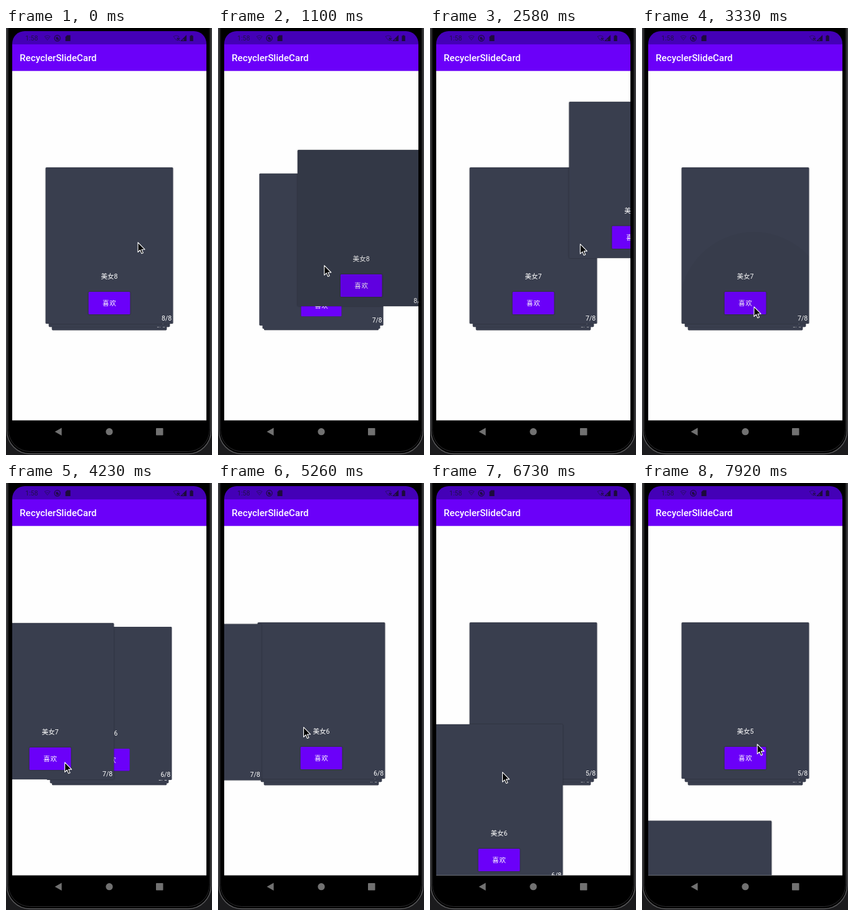
Write an HTML page that moves like this. It is 331x683 px and loops after 8 s.

```html
<!DOCTYPE html>
<html lang="zh-CN">
<head>
<meta charset="utf-8">
<title>Slide cards</title>
<style>
  html, body { margin: 0; width: 100%; height: 100%; overflow: hidden; background: #1b1b1d; }
  svg { display: block; width: 331px; height: 683px; }
  text { font-family: Roboto, "Noto Sans CJK SC", "Noto Sans CJK", sans-serif; fill: #fff; }
  .card > text { font-size: 10.6px; }
  .mid { text-anchor: middle; }
  .end { text-anchor: end; }
  .face { fill: #393e4e; filter: drop-shadow(0 .7px .8px rgba(0, 0, 0, .35)); }
  .button { fill: #6b00f9; filter: drop-shadow(0 .8px .8px rgba(0, 0, 0, .4)); }
  .dark { fill: #1d0b3c; }
  .line { fill: none; stroke: #1d0b3c; stroke-width: 1.2; }
  .faint { fill: none; stroke: #2c0c70; }
</style>
</head>
<body>
<svg viewBox="0 0 331 683">
  <defs>
    <clipPath id="screen"><rect x="10" y="5" width="312" height="659" rx="20"/></clipPath>
    <clipPath id="content"><rect x="10" y="68.7" width="312" height="558.9"/></clipPath>
    <clipPath id="cardShape"><rect x="-102.4" y="-125" width="204.800" height="250" rx="1.5"/></clipPath>
  </defs>

  <!-- phone body -->
  <rect x="1.5" y="-60" width="328" height="741" rx="37" fill="#000" stroke="#5b5b5d" stroke-width="1.4"/>
  <rect x="3.8" y="-60" width="323.400" height="737.500" rx="35" fill="none" stroke="#2c2c2e"/>

  <g clip-path="url(#screen)">
    <rect x="10" y="5" width="312" height="659" fill="#000"/>
    <rect x="10" y="68" width="312" height="559.6" fill="#fefefe"/>
    <rect x="10" y="26" width="312" height="42.7" fill="#6b00f9"/>
    <rect x="10" y="5" width="312" height="21.2" fill="#4400b7"/>
  </g>

  <!-- status bar -->
  <text x="31" y="20" style="font-size:10.6px;fill:#21104a">1:58</text>
  <path class="faint" d="M62 13.5q4.500-3 9 0l-4.500 6zM64.500 15.500h4"/>
  <circle class="line" cx="82.500" cy="16.300" r="4.600"/>
  <path class="dark" d="M80 14.500h4.500l-2 2h2.500v2.200h-4z"/>
  <path class="dark" d="M98.200 11.500h5.300v9.500h-8v-6.700z"/>
  <path class="faint" d="M269 13.500q4.500-3 9 0l-4.500 6z"/>
  <path class="line" d="M275 16l4 4m0-4l-4 4M281.500 20.500l8-8v8z"/>
  <path class="dark" d="M285.500 16.500l4-4v8h-4z"/>
  <path class="dark" d="M296.800 11.500h2.600v1h1.400v8.500h-5.400v-8.500h1.400z"/>
  <text x="22.100" y="53" style="font-size:15.17px;font-weight:500">RecyclerSlideCard</text>

  <g id="stack" clip-path="url(#content)"></g>

  <!-- navigation bar -->
  <g fill="#717171">
    <path d="M78.500 645.700l11-6.200v12.400z"/>
    <circle cx="166" cy="645.700" r="5.600"/>
    <rect x="241" y="640" width="11.500" height="11.500" rx=".8"/>
  </g>

  <path id="cursor" d="M0 0v15.500l3.500-3.400 2.400 5.600 2.500-1-2.400-5.500h5z"
        fill="#000" stroke="#fff" stroke-width="1.100" stroke-linejoin="round"/>
</svg>

<script>
const LOOP = 8000, START = 360, STEP = 148;
const CENTER = [166, 348.1];
const FULL_SWIPE = 156, SCALE_GAP = 0.05, DROP_GAP = 11.37;
const CURSOR_FOLLOW = 0.9;
const HOME = [0, 0];
const REST = [212, 343];

// A card is dragged to `release`, flung to `out`; the cursor then glides on to `next`.
const swipes = [
  { card: 8, drag: [808, 1988], fling: [1988, 3024], grab: [113, 405],
    bend: [108, -28], release: [126.5, -127], out: [305, -10],
    via: [275, 340], next: [180, 446] },
  { card: 7, drag: [3320, 3912], fling: [4208, 5688], grab: [180, 446],
    bend: [-48, 0], release: [-95, 1], out: [-397, 5],
    via: [133, 423], next: [166, 316] },
  { card: 6, drag: [5984, 6724], fling: [6724, 8204], grab: [166, 316],
    bend: [-27, 80], release: [-55, 163], out: [-65, 464],
    via: [112, 480], next: [197, 408] }
];

const clamp = (v, lo = 0, hi = 1) => Math.min(hi, Math.max(lo, v));
const progress = (t, [from, to]) => clamp((t - from) / (to - from));
const mix = (a, b, p) => a.map((v, i) => v + (b[i] - v) * p);
const arc = (a, via, b, p) => mix(mix(a, via, p), mix(via, b, p), p);
const easeOut = p => 1 - (1 - p) ** 1.5;
const easeIn = p => p ** 3;

function offset(s, t) {
  return t < s.fling[0]
    ? arc(HOME, s.bend, s.release, easeOut(progress(t, s.drag)))
    : mix(s.release, s.out, easeIn(progress(t, s.fling)));
}

function cursorAt(t) {
  const i = swipes.findLastIndex(s => t >= s.drag[0]);
  if (i < 0) return mix(REST, swipes[0].grab, progress(t, [212, swipes[0].drag[0]]));
  const s = swipes[i];
  const [dx, dy] = offset(s, Math.min(t, s.fling[0]));
  const held = [s.grab[0] + dx * CURSOR_FOLLOW, s.grab[1] + dy * CURSOR_FOLLOW];
  const glideEnd = swipes[i + 1]?.drag[0] ?? LOOP;
  const p = progress(t, [s.fling[0], glideEnd]);
  return p > 0 ? arc(held, s.via, s.next, p) : held;
}

function rippleAt(s, t) {
  const age = t - s.drag[0] + 100;
  return {
    cx: s.grab[0] - CENTER[0],
    cy: s.grab[1] - CENTER[1],
    r: clamp(60 + 0.6 * age, 0, 300),
    opacity: 0.1 * clamp(Math.min(age / 300, (s.drag[1] - t) / 400))
  };
}

function makeCard(n) {
  const g = document.createElementNS("http://www.w3.org/2000/svg", "g");
  g.setAttribute("class", "card");
  g.innerHTML = `
    <rect class="face" x="-102.4" y="-125" width="204.8" height="250" rx="1.5"/>
    <text class="mid" y="53">美女${n}</text>
    <rect class="button" x="-33.4" y="73.8" width="66.8" height="36.2" rx="1.5"/>
    <text class="mid" x=".3" y="96" letter-spacing=".6">喜欢</text>
    <text class="end" x="100.3" y="120">${n}/8</text>
    <g clip-path="url(#cardShape)"><circle class="ripple" r="0"/></g>`;
  document.getElementById("stack").prepend(g);
  return { n, g, ripple: g.querySelector(".ripple"), swipe: swipes.find(s => s.card === n) };
}

const cards = [8, 7, 6, 5, 4, 3, 2].map(makeCard); // front to back
const cursor = document.getElementById("cursor");

function place(el, [x, y], scale = 1) {
  el.setAttribute("transform", `translate(${x} ${y}) scale(${scale})`);
}

function draw(t) {
  let passed = 0; // how far the stack has moved up, in cards
  for (const { n, g, ripple, swipe } of cards) {
    const depth = 8 - n - passed;
    const level = clamp(depth, 0, 2);
    const [dx, dy] = swipe ? offset(swipe, t) : HOME;
    g.style.display = depth > 3 ? "none" : "";
    place(g, [CENTER[0] + dx, CENTER[1] + dy + level * DROP_GAP], 1 - level * SCALE_GAP);
    if (swipe) {
      for (const [k, v] of Object.entries(rippleAt(swipe, t))) ripple.setAttribute(k, v);
    }
    passed += clamp(Math.hypot(dx, dy) / FULL_SWIPE);
  }
  place(cursor, cursorAt(t));
}

function frame() {
  const t = performance.now() % LOOP;
  draw(t < START ? 0 : START + Math.floor((t - START) / STEP) * STEP);
  requestAnimationFrame(frame);
}
frame();
</script>
</body>
</html>
```
